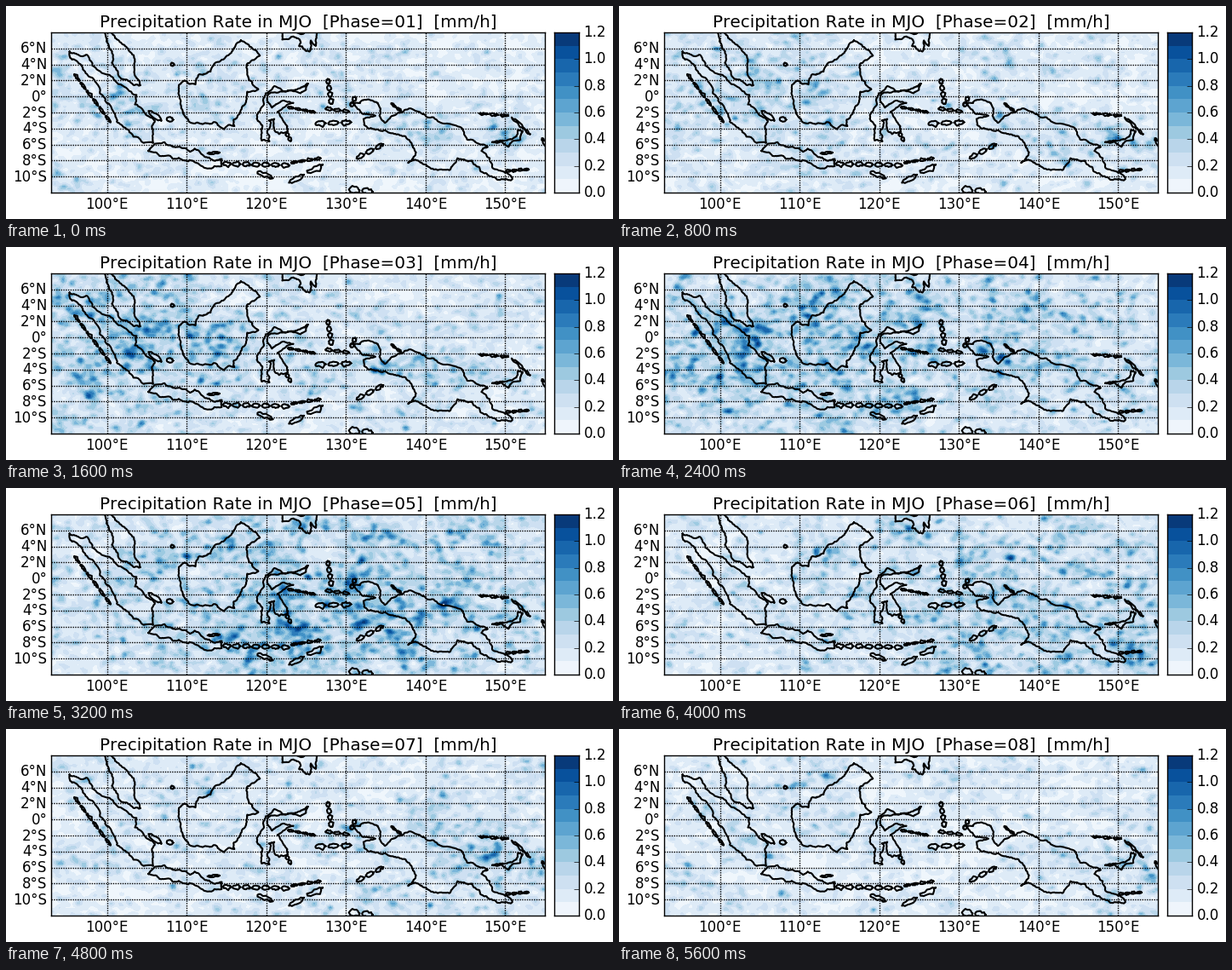
These frames come from a looping animation (713 by 250 pixels, 6400 ms). A matplotlib script:

```python
import numpy as np
import matplotlib.pyplot as plt
from matplotlib.animation import FuncAnimation

W, H, DPI = 713, 250, 100
WEST, EAST, SOUTH, NORTH = 93, 155, -12, 8
LEFT, BOTTOM, WIDTH, HEIGHT = 53.2, 31, 580, 188
LEVELS = np.linspace(0, 1.2, 13)
PHASES = 8
plt.rcParams.update({"font.family": "DejaVu Sans", "text.kerning_factor": 6})

# Key points of the main coasts as (lon, lat); fine detail is generated
SUMATRA = [(95.3, 5.6), (97.5, 5.2), (100.3, 2.7), (103.7, .2), (103.5, -1), (104.9, -2.3),
           (106, -3), (105.8, -5.8), (104.6, -5.8), (102.3, -3.9), (100.8, -1.9),
           (99.1, .6), (97.7, 2.5), (95.6, 4.6)]
MALAYA = [(98.6, 8.3), (100.3, 6), (100.6, 4.2), (101.4, 2.7), (103.4, 1.4), (104.2, 1.4),
          (103.4, 3), (103.4, 4.8), (101.6, 6.8), (100.3, 8.3)]
BORNEO = [(116.8, 7), (119.2, 5.1), (117.6, 4.1), (117.9, 2), (119, .9), (117.6, .6),
          (117.4, -.8), (116.4, -2.4), (116, -3.7), (114.7, -4.1), (113.5, -3.2),
          (111.8, -3.4), (110.2, -2.9), (109.1, -.2), (109, 1.4), (109.7, 2), (111.1, 1.5),
          (111.5, 2.7), (113, 3.1), (115.4, 5.3)]
JAVA = [(105.2, -6.8), (106, -5.9), (108.3, -6.3), (110.4, -6.9), (111, -6.5),
        (112.8, -7.6), (114.4, -7.8), (114.4, -8.7), (111, -8.2), (108.3, -7.8),
        (106.5, -7.3)]
SULAWESI = [(125.2, 1.6), (123.9, .9), (121, 1.3), (119.9, .4), (119.7, -.9), (118.8, -2.8),
            (119.5, -3.6), (119.4, -5.5), (120.4, -5.6), (120.3, -3), (121, -2.8),
            (120.9, -3.6), (121.6, -4.7), (122.7, -4.4), (122.2, -3.2), (121.4, -1.9),
            (123.4, -.8), (121.4, -.9), (120.7, -1.4), (120.1, -.5), (120.6, .5),
            (124.3, .4)]
NEW_GUINEA = [(131, -.9), (132.4, -.4), (134, -.8), (134.2, -2.4), (134.9, -3.3),
              (136.2, -2.3), (137.9, -1.5), (141, -2.6), (144.5, -3.9), (145.8, -5.4),
              (147.8, -6.3), (147, -6.8), (148.5, -9), (150.9, -10.3), (149, -10.4),
              (147, -9.4), (145.8, -8), (144, -7.7), (143, -9.2), (141, -9.1), (139, -8),
              (137.8, -8.3), (138.8, -7), (137.5, -5), (135.2, -4.4), (132.8, -4),
              (132.2, -2.8), (133.7, -2.4), (132.2, -2.2)]
NEW_BRITAIN = [(148.4, -5.7), (150, -5.5), (151.4, -5), (151.6, -4.2), (152.2, -4.3),
               (151.9, -5.4), (150.4, -6.3)]
MINDANAO = [(122.2, 8.3), (122, 7.1), (123.4, 7.5), (124.2, 7.1), (124.1, 6.3),
            (125.4, 5.6), (125.6, 7), (126.2, 6.3), (126.5, 8.3)]
COASTS = SUMATRA, MALAYA, BORNEO, JAVA, SULAWESI, NEW_GUINEA, NEW_BRITAIN, MINDANAO

# Island chains: start, end, number of islands, half width
CHAINS = [
    ((95.8, 2.9), (100.5, -3.3), 6, .15), ((105.2, -1.8), (106.8, -3), 1, .3),
    ((107.5, -2.8), (108.3, -2.9), 1, .3), ((108, 4), (108.4, 4), 1, .2),
    ((112.6, -7.1), (114.1, -7), 1, .15), ((114.4, -8.4), (123, -8.6), 7, .25),
    ((123, -8.3), (126.9, -7.7), 4, .14), ((118.9, -9.4), (120.8, -10.2), 1, .3),
    ((122.6, -10.9), (127.3, -8.4), 2, .3), ((122.5, -4.5), (123.1, -5.6), 2, .2),
    ((122.6, -1.3), (126.2, -2), 4, .13), ((127.7, 2.3), (128.2, -1), 4, .25),
    ((126, -3.4), (130.8, -3.2), 3, .28), ((127.3, -1.5), (130.5, -1.9), 3, .15),
    ((130.6, -1.3), (131.2, 0), 2, .25), ((135.6, -.8), (137, -1.9), 2, .12),
    ((131.2, -7.8), (134.8, -5.9), 3, .25), ((146.6, -2.1), (150.5, -2.4), 3, .12),
    ((150.8, -2.6), (153.1, -4.7), 1, .2), ((150, -9.3), (153, -9.1), 4, .13),
    ((154.6, -5.2), (155.2, -6.2), 1, .2), ((130.2, -11.6), (133.5, -11.9), 2, .4)]

# Land that attracts rain: lon, lat, size x, size y
WET_LAND = [(112.5, 1, 2.8, 2.8), (103, -1, 3, 2.2), (140.5, -4.3, 4.5, 1.5),
            (150.5, -5, 2, 1)]

lon = np.arange(WEST, EAST + .1, .25)
lat = np.arange(SOUTH, NORTH + .1, .25)
LON, LAT = np.meshgrid(lon, lat)


def bump(x, y, sx, sy):
    return np.exp(-((LON - x) / sx) ** 2 / 2 - ((LAT - y) / sy) ** 2 / 2)


def smooth_noise(rng, sx, sy):
    """Unit-variance noise blurred by sx, sy grid cells."""
    noise = rng.normal(size=LON.shape)
    for axis, s in ((0, sy), (1, sx)):
        half = int(3 * s) + 1
        kernel = np.exp(-(np.arange(-half, half + 1) / s) ** 2 / 2)
        pad = [(0, 0), (0, 0)]
        pad[axis] = (half, half)
        noise = np.apply_along_axis(np.convolve, axis, np.pad(noise, pad, "wrap"),
                                    kernel, "valid")
    return (noise - noise.mean()) / noise.std()


def rain_field(phase):
    """Land rain plus a wet band that drifts east and south with the phase."""
    rng = np.random.default_rng(40 + phase)
    active = np.exp(-((phase - 4.5) / 1.6) ** 2 / 2)
    land = .17 * (.6 + .4 * np.cos(2 * np.pi * (phase - 1.5) / PHASES))
    band = bump(50.5 + 15.5 * phase, 4.5 - 1.5 * phase, 17, 7)
    mean = .13 + .06 * active + (.1 + .15 * active) * band
    mean += land * sum(bump(*spot) for spot in WET_LAND)
    texture = np.exp(.45 * smooth_noise(rng, 1.15, .85) + .2 * smooth_noise(rng, 6, 4) - .1)
    rate = mean * texture
    return rate / np.hypot(1, rate / 1.6)


def rough(points, rng, depth, wobble=.1):
    """Closed outline, refined by displacing the middle of every edge."""
    line = np.array(points)
    for _ in range(depth):
        step = np.roll(line, -1, axis=0) - line
        normal = step[:, ::-1] * (-1, 1)
        mid = line + step / 2 + normal * rng.normal(0, wobble, (len(line), 1))
        line = np.stack([line, mid], axis=1).reshape(-1, 2)
    return np.vstack([line, line[:1]])


def chain(start, end, count, half_width):
    """Ellipses lined up between two points."""
    start, end = np.array(start), np.array(end)
    slot = (end - start) / count
    across = slot[::-1] * (-1, 1) / np.hypot(*slot) * half_width
    t = np.linspace(0, 2 * np.pi, 8, endpoint=False)[:, None]
    shape = np.cos(t) * slot * (.5 if count == 1 else .4) + np.sin(t) * across
    return [start + slot * (i + .5) + shape for i in range(count)]


def box(left, bottom, width, height):
    ax = fig.add_axes([left / W, bottom / H, width / W, height / H])
    ax.tick_params(length=0)
    for spine in ax.spines.values():
        spine.set_linewidth(1)
    return ax


def label(x, y, text, ha="center", size=12):
    return fig.text(x / W, 1 - y / H, text, ha=ha, va="baseline", size=size)


fig = plt.figure(figsize=(W / DPI, H / DPI), dpi=DPI, facecolor="white")
ax = box(LEFT, BOTTOM, WIDTH, HEIGHT)
ax.set(xlim=(WEST, EAST), ylim=(SOUTH, NORTH), xticks=[], yticks=[])

rng = np.random.default_rng(5)
outlines = [rough(coast, rng, 4) for coast in COASTS]
outlines += [rough(isle, rng, 1, .2) for spec in CHAINS for isle in chain(*spec)]
for line in outlines:
    ax.plot(*line.T, color="black", lw=1.5, zorder=4)

x_scale, y_scale = WIDTH / (EAST - WEST), HEIGHT / (NORTH - SOUTH)
dots = dict(color="black", lw=1, dashes=(1, 1), zorder=3)
for d in range(100, 151, 10):
    ax.plot([d, d], [SOUTH, NORTH], **dots)
    label(LEFT + (d - WEST) * x_scale, 238.5, f"{d}°E")
for d in range(-10, 7, 2):
    ax.plot([WEST, EAST], [d, d], **dots)
    side = "N" if d > 0 else "S" if d else ""
    label(48.5, H - BOTTOM - (d - SOUTH) * y_scale + 5.6, f"{abs(d)}°{side}", "right")

bar = box(644, BOTTOM, 29, HEIGHT)
bar.imshow(LEVELS[:-1, None] + .05, cmap="Blues", vmin=0, vmax=1.2, origin="lower",
           extent=(0, 1, 0, 1.2), aspect="auto", interpolation="nearest")
bar.set(xticks=[], yticks=LEVELS[::2])
bar.tick_params(axis="y", left=False, right=True, labelleft=False, labelright=False,
                direction="in", length=4, width=.5)
for v in LEVELS[::2]:
    label(678.5, H - BOTTOM - v / 1.2 * HEIGHT + 5, f"{v:.1f}", "left")

title = label(LEFT + WIDTH / 2, 25.2, "", size=14.4)
fields = [rain_field(phase) for phase in range(1, PHASES + 1)]
shown = []


def draw(index):
    while shown:
        shown.pop().remove()
    shown.append(ax.contourf(lon, lat, fields[index], LEVELS, cmap="Blues", zorder=1))
    title.set_text(f"Precipitation Rate in MJO  [Phase={index + 1:02d}]  [mm/h]")
    return [title]


anim = FuncAnimation(fig, draw, frames=PHASES, interval=800, repeat=True, blit=False)
plt.show()
```
